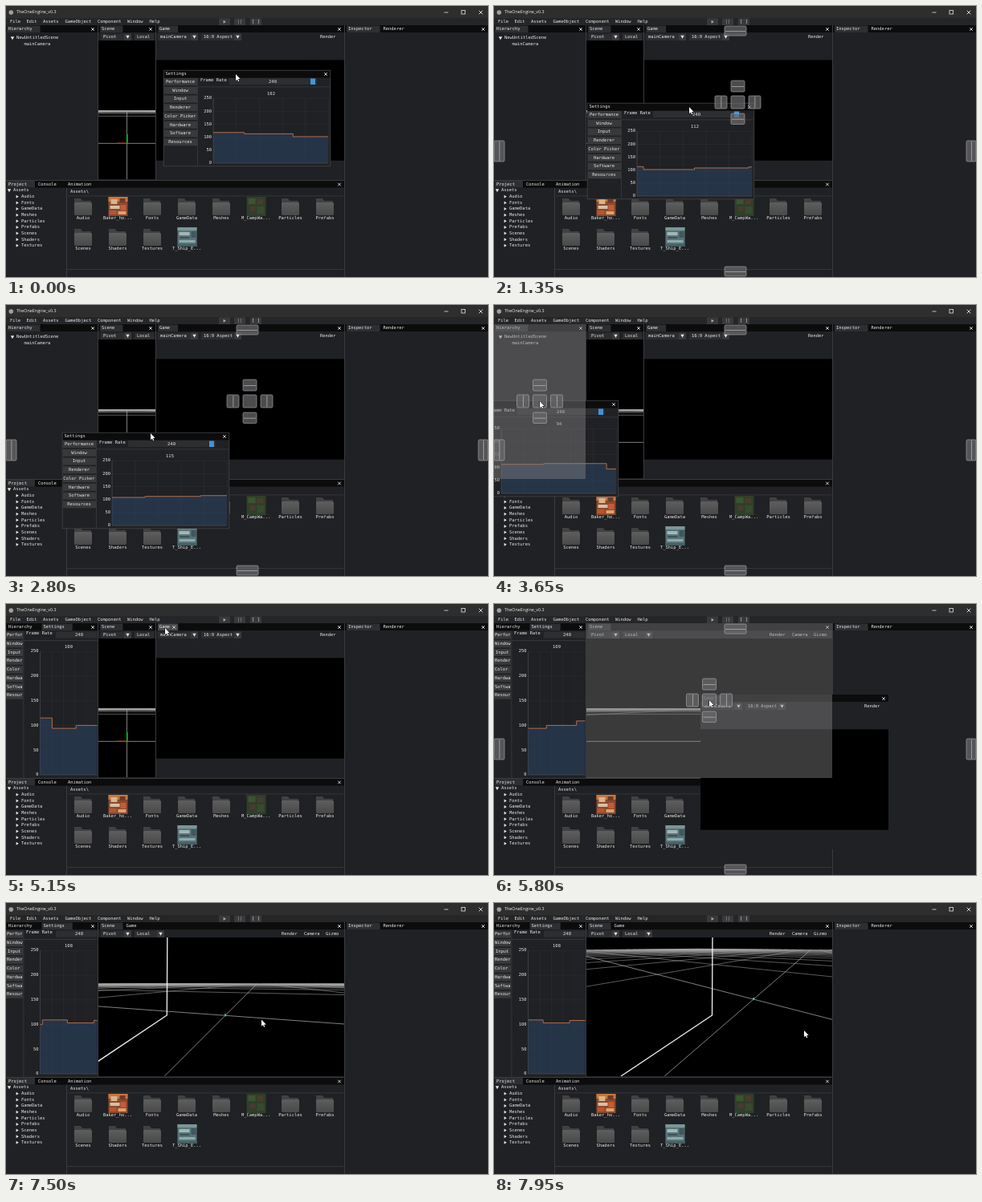
Recreate the animation shown at these times as an HTML page with a canvas. Size 600x338 px, loop 8000 ms.

```html
<!DOCTYPE html>
<html lang="en">
<head>
<meta charset="utf-8">
<title>Engine editor</title>
<style>
html, body { margin: 0; width: 100%; height: 100%; overflow: hidden; background: #202123; }
canvas { display: block; }
</style>
</head>
<body>
<canvas id="stage" width="600" height="338"></canvas>
<script>
const ctx = document.getElementById('stage').getContext('2d');
const LOOP = 8000, STEP = 50;
const MONO = '5.45px "DejaVu Sans Mono", monospace', CHAR = 3.28;
const BG = '#202124', BAR = '#0c0c0d', TAB = '#2e2f32', HOVER = '#4b4b4d', FRAME = '#38393b';
const EDGE = '#3a3b40', INK = '#e6e6e6';

// ---- helpers
function rect(x, y, w, h, color) { ctx.fillStyle = color; ctx.fillRect(x, y, w, h); }

function text(s, x, y, align = 'left', color = INK) {
  ctx.font = MONO;
  ctx.textAlign = align;
  ctx.fillStyle = color;
  ctx.fillText(s, x, y);
}

function path(points, color, width = 1) {
  ctx.beginPath();
  points.forEach(([x, y]) => ctx.lineTo(x, y));
  ctx.strokeStyle = color;
  ctx.lineWidth = width;
  ctx.stroke();
}

function shape(points, color) {
  ctx.beginPath();
  points.forEach(([x, y]) => ctx.lineTo(x, y));
  ctx.fillStyle = color;
  ctx.fill();
}

function clipped(x, y, w, h, draw) {
  ctx.save();
  ctx.beginPath();
  ctx.rect(x, y, w, h);
  ctx.clip();
  draw();
  ctx.restore();
}

function cross(x, y, r = 1.8) {
  path([[x - r, y - r], [x + r, y + r]], INK, 0.9);
  path([[x - r, y + r], [x + r, y - r]], INK, 0.9);
}

const arrowDown = (x, y, r = 2.2) => shape([[x - r, y - r * 0.8], [x + r, y - r * 0.8], [x, y + r]], INK);
const arrowRight = (x, y, color = INK) => shape([[x - 1.4, y - 2], [x - 1.4, y + 2], [x + 1.8, y]], color);
const mix = (a, b, k) => a + (b - a) * k;
const smooth = k => k * k * (3 - 2 * k);
const clamp01 = k => Math.min(1, Math.max(0, k));

// keys: [time, x, y] in order
function follow(keys, t) {
  const i = keys.findIndex(key => key[0] > t);
  if (i < 0) return keys[keys.length - 1].slice(1);
  if (i === 0) return keys[0].slice(1);
  const [a, b] = [keys[i - 1], keys[i]];
  const k = smooth((t - a[0]) / (b[0] - a[0]));
  return [mix(a[1], b[1], k), mix(a[2], b[2], k)];
}

// ---- timeline
const CURSOR = [
  [0, 286, 85], [250, 430, 45], [450, 531, 21], [650, 440, 55], [850, 322, 85], [950, 322, 85],
  [1350, 243, 126], [1600, 160, 172], [1750, 140, 183], [1900, 290, 90], [2000, 410, 7],
  [2120, 487, 50], [2250, 376, 106], [2500, 285, 140], [2800, 180, 160], [2950, 150, 185],
  [3250, 60, 110], [3500, 57, 120], [3900, 57, 120], [4250, 70, 110], [4700, 230, 12],
  [5000, 198, 30], [5200, 198, 30], [5600, 268, 120], [5950, 268, 120], [6300, 20, 285],
  [6650, 126, 30], [6950, 126, 30], [7250, 290, 140], [7950, 386, 159]];
const GRAB = [[950, 126, 5], [1350, 127, 5], [2250, 117.5, 6], [2800, 110.5, 1]];
const DRAG_SETTINGS = 900, DOCK_SETTINGS = 3700;
const DRAG_GAME = 5200, DROP_GAME = 5950, DOCK_GAME = 6000, PICK_SCENE = 6900;
const FPS = [[-9999, 118], [-1544, 113], [-647, 102], [291, 108], [1291, 112], [2315, 115],
  [3474, 94], [4356, 100], [5465, 109], [6383, 103], [7362, 108]];
const fpsAt = t => FPS.filter(f => f[0] <= t).pop()[1];

// ---- panels
function panel(x, y, w, h, tabs, selected, hovered = -1) {
  rect(x, y, w, h, BG);
  rect(x, y, w, 9, BAR);
  let tx = x === 0 ? 3 : x + 4;
  tabs.forEach((name, i) => {
    const width = name.length * CHAR;
    const color = i === selected ? (i === hovered ? HOVER : TAB) : BAR;
    rect(tx - 2, y + 0.5, width + 12, 8.5, color);
    text(name, tx, y + 5);
    if (i === hovered) cross(tx + width + 5, y + 5);
    tx += width + 14;
  });
  cross(x + w - 6, y + 5);
}

function combo(label, x, w, arrow = true) {
  rect(x, 34.5, w, 8.5, '#2c2d2f');
  if (arrow) {
    rect(x + w - 9, 34.5, 9, 8.5, FRAME);
    arrowDown(x + w - 4.5, 38.5);
  }
  text(label, x + 3, 38.7);
}

function gameBody(x, w, y = 24) {
  ctx.save();
  ctx.translate(0, y - 24);
  combo('mainCamera', x + 2, 50);
  combo('16:9 Aspect', x + 56, 50);
  text('Render', x + w - 30, 38.7);
  const viewHeight = Math.min(164, w * 0.536);
  rect(x, 130 - viewHeight / 2, w, viewHeight, '#000');
  ctx.restore();
}

// Perspective ground grid; k goes from the front view (0) to the turned view (1)
function sceneView(x, w, k) {
  const cx = x + w / 2, f = 158;
  const angle = 0.685 * k, c = Math.cos(angle), s = Math.sin(angle);
  const height = 0.0535 * Math.pow(0.275 / 0.0535, k);
  const horizon = mix(130.3, 56, k);
  const ox = -0.246 * k, oz = mix(0.206, 0.675, k);
  const project = (u, v) => [(u + ox) * c + (v + oz) * s, (v + oz) * c - (u + ox) * s];
  const toScreen = ([px, pz]) => [cx + f * px / pz, horizon + f * height / pz];
  function line(a, b, color, width) {
    let [p, q] = [project(...a), project(...b)];
    const near = 0.02;
    if (p[1] < near && q[1] < near) return;
    if (p[1] > q[1]) [p, q] = [q, p];
    if (p[1] < near) p = [mix(p[0], q[0], (near - p[1]) / (q[1] - p[1])), near];
    path([toScreen(p), toScreen(q)], color, width);
  }
  clipped(x, 43, w, 173, () => {
    rect(x, 43, w, 173, '#000');
    for (let i = -24; i <= 24; i++) {
      const color = i ? `rgba(165,165,165,${0.72 - Math.abs(i) * 0.022})` : '#a0a0a0';
      line([i, -24], [i, 24], color, 0.8);
      line([-24, i], [24, i], color, 0.8);
    }
    if (k < 0.3) {
      rect(cx - 0.5, 160, 1.6, 11, '#00d020');
      rect(cx - 12, 170.4, 12, 1, '#b02818');
    } else {
      const shift = (1 - k) * 120;
      path([[158 - shift, 216], [271.5 - shift, 140], [272 - shift, 43]], '#f4f4f4', 1.3);
      const [gx, gy] = toScreen(project(0, 0));
      rect(gx - 1, gy - 2, 2, 3, '#4fb8b0');
    }
  });
}

function scenePanel(t) {
  const merged = t >= DRAG_GAME, docked = t >= DOCK_GAME;
  const w = merged ? 306 : 71;
  const showGame = docked && t < PICK_SCENE;
  panel(115, 24, w, 193, docked ? ['Scene', 'Game'] : ['Scene'], showGame ? 1 : 0, t >= 6600 && t < 7050 ? 0 : -1);
  if (showGame) return gameBody(115, w);
  combo('Pivot', 118, 38);
  combo('Local', 160, merged ? 37 : 24, merged);
  if (merged) [['Render', 343], ['Camera', 371], ['Gizmo', 398]].forEach(([s, x]) => text(s, x, 38.7));
  sceneView(115, w, smooth(clamp01((t - 7150) / 800)));
}

// ---- settings
const PAGES = ['Performance', 'Window', 'Input', 'Renderer', 'Color Picker', 'Hardware', 'Software', 'Resources'];

function plot(x, y, w, h, t) {
  const span = 2118, right = x + w, bottom = y + h;
  const level = v => bottom - v * h / 250;
  for (let i = 0; i <= 5; i++) {
    rect(x, level(i * 50), w, 0.6, 'rgba(255,255,255,.05)');
    rect(x + i * w / 5, y, 0.6, h, 'rgba(255,255,255,.06)');
    text(String(i * 50), x - 2, level(i * 50), 'right');
  }
  const points = [];
  FPS.forEach(([time, v], i) => {
    if (time > t) return;
    const px = right - (t - time) / span * w;
    if (i) points.push([px, level(FPS[i - 1][1])]);
    points.push([px, level(v)]);
  });
  points.push([right, level(fpsAt(t))]);
  clipped(x, y, w, h, () => {
    shape([...points, [right, bottom], [x - 9999, bottom]], 'rgba(42,66,98,.6)');
    path(points, '#b06c48', 1);
  });
  path([[x, y], [x, bottom], [right, bottom]], '#4c4e52', 0.6);
}

function settingsFloating(x, y, t) {
  ctx.save();
  ctx.translate(Math.round(x), Math.round(y));
  rect(0, 0, 208, 120, BG);
  rect(0, 0, 208, 9.5, BAR);
  text('Settings', 2.5, 5);
  cross(202, 5);
  PAGES.forEach((name, i) => {
    rect(1, 10 + i * 10.75, 41, 9, FRAME);
    text(name, 21, 14.4 + i * 10.75, 'center');
  });
  rect(42, 10, 0.8, 109, EDGE);
  text('Frame Rate', 46, 13);
  rect(82, 10, 109, 8, '#2d2e30');
  rect(183, 10.5, 6, 7.5, '#3c96dc');
  text('240', 136, 14.3, 'center');
  rect(43, 20.5, 164, 0.8, EDGE);
  text(String(fpsAt(t)), 134, 30, 'center');
  plot(62, 35, 143, 81, t);
  ctx.strokeStyle = '#434446';
  ctx.lineWidth = 0.8;
  ctx.strokeRect(0.2, 0.2, 207.6, 119.6);
  ctx.restore();
}

function settingsDocked(t) {
  panel(0, 24, 114, 193, ['Hierarchy', 'Settings'], 1);
  clipped(0, 33, 21, 184, () => PAGES.forEach((name, i) => {
    rect(0, 34.5 + i * 10.75, 21, 9, FRAME);
    text(name, name.length < 6 ? 2 : 1, 38.8 + i * 10.75);
  }));
  rect(21.5, 34, 0.8, 183, EDGE);
  clipped(22, 33, 91.5, 184, () => {
    text('Frame Rate', 25, 37);
    rect(62, 34.5, 58, 8, '#2d2e30');
    text('240', 91, 38.5, 'center');
    rect(22, 45, 92, 0.8, EDGE);
    text(String(fpsAt(t)), 78, 54, 'center');
    plot(42.5, 59, 71.5, 154, t);
  });
}

// ---- asset browser
function folder(cx, y) {
  shape([[cx - 11, y + 1], [cx - 3, y + 1], [cx - 1, y + 4], [cx + 10, y + 4], [cx + 10, y + 8], [cx - 11, y + 8]], '#414141');
  const shade = ctx.createLinearGradient(0, y + 6, 0, y + 22);
  shade.addColorStop(0, '#5e5e5e');
  shade.addColorStop(1, '#494949');
  ctx.beginPath();
  ctx.roundRect(cx - 11, y + 6, 22, 16, 1.5);
  ctx.fillStyle = shade;
  ctx.fill();
}

const PICTURES = {
  'Baker_ho...': (x, y) => {
    rect(x, y, 24, 24, '#8a4a2e');
    rect(x, y, 24, 6, '#c8763c');
    rect(x + 3, y + 3, 8, 6, '#d9b48c');
    rect(x + 14, y + 2, 7, 5, '#6d3a2a');
    rect(x + 2, y + 11, 12, 4, '#d6c0a4');
    rect(x + 15, y + 10, 7, 7, '#c85a34');
    rect(x + 1, y + 17, 9, 5, '#b8552f');
    rect(x + 12, y + 18, 10, 4, '#dca270');
  },
  'M_CampWa...': (x, y) => {
    rect(x, y, 24, 24, '#2f3f29');
    rect(x + 2, y + 2, 9, 7, '#3c5430');
    rect(x + 13, y + 3, 8, 6, '#4a3b2e');
    rect(x + 4, y + 12, 7, 6, '#4b3a33');
    rect(x + 13, y + 12, 9, 9, '#37492f');
  },
  'T_Ship_E...': (x, y) => {
    rect(x, y, 24, 24, '#587478');
    rect(x, y, 24, 4, '#7b9699');
    rect(x + 2, y + 6, 13, 4, '#a3b6b6');
    rect(x + 17, y + 5, 6, 8, '#3f585e');
    rect(x + 3, y + 12, 12, 2, '#39535a');
    rect(x + 2, y + 16, 20, 3, '#8fa9aa');
    rect(x, y + 21, 24, 3, '#435f65');
  }
};
const ASSETS = [
  ['Audio', 'Baker_ho...', 'Fonts', 'GameData', 'Meshes', 'M_CampWa...', 'Particles', 'Prefabs'],
  ['Scenes', 'Shaders', 'Textures', 'T_Ship_E...']];
const FOLDERS = ASSETS.flat().filter(name => !PICTURES[name]);

function projectPanel() {
  panel(0, 217.5, 421, 120.5, ['Project', 'Console', 'Animation'], 0);
  arrowDown(4, 230);
  text('Assets', 9, 230);
  FOLDERS.forEach((name, i) => {
    arrowRight(14, 237.8 + i * 7.63);
    text(name, 19, 237.8 + i * 7.63);
  });
  rect(75, 227, 1, 111, EDGE);
  text('Assets\\', 80, 231.8);
  rect(77, 236.5, 343, 0.8, EDGE);
  rect(76, 328, 344, 0.8, EDGE);
  ASSETS.forEach((row, r) => row.forEach((name, i) => {
    const cx = 96 + i * 43, y = 239 + r * 38;
    if (PICTURES[name]) PICTURES[name](cx - 12 + 0.5, y - 1);
    else folder(cx, y);
    text(name, cx, y + 26, 'center');
  }));
}

// ---- docking guides
function guide(x, y, w, h, split) {
  ctx.beginPath();
  ctx.roundRect(x, y, w, h, 1.5);
  ctx.fillStyle = 'rgba(105,106,108,.72)';
  ctx.fill();
  ctx.strokeStyle = 'rgba(175,175,175,.75)';
  ctx.lineWidth = 0.8;
  ctx.stroke();
  if (split === 'h') rect(x + 1, y + h / 2, w - 2, 0.8, 'rgba(195,195,195,.8)');
  if (split === 'v') rect(x + w / 2, y + 1, 0.8, h - 2, 'rgba(195,195,195,.8)');
}

function dockGuides(cx) {
  guide(287, 25, 27, 12, 'h');
  guide(287, 325, 27, 12, 'h');
  guide(0, 168, 13, 26, 'v');
  guide(588, 168, 12, 26, 'v');
  guide(cx - 8.5, 112, 17, 16);
  guide(cx - 8.5, 93, 17, 14, 'h');
  guide(cx - 8.5, 134, 17, 13.5, 'h');
  guide(cx - 28.5, 112, 15, 16, 'v');
  guide(cx + 13.5, 112, 15, 16, 'v');
}

// ---- window frame
function chrome() {
  rect(0, 0, 600, 338, BG);
  rect(0, 0, 600, 15, '#2e2e2e');
  rect(0, 0, 600, 1, '#25301f');
  ctx.beginPath();
  ctx.arc(6.3, 8, 2.8, 0, 7);
  ctx.fillStyle = '#a0a0a0';
  ctx.fill();
  ctx.font = '5.4px "Open Sans", sans-serif';
  ctx.textAlign = 'left';
  ctx.fillStyle = '#f2f2f2';
  ctx.fillText('TheOneEngine_v0.3', 13, 8);
  path([[545.5, 8], [550.5, 8]], INK, 0.8);
  ctx.strokeStyle = INK;
  ctx.strokeRect(567, 5.5, 4.5, 4.5);
  cross(591, 8, 2.3);
  rect(0, 15, 600, 9, '#252628');
  [['File', 5], ['Edit', 25.5], ['Assets', 46], ['GameObject', 73.5], ['Component', 114], ['Window', 151], ['Help', 178.5]]
    .forEach(([s, x]) => text(s, x, 19.6));
  [265, 284, 304].forEach(x => rect(x, 15.5, 14, 8.5, FRAME));
  arrowRight(272, 19.7, '#b0b0b0');
  text('||', 291, 19.6, 'center', '#b0b0b0');
  text('[ ]', 311, 19.6, 'center');
}

function pointer(x, y) {
  const outline = [[0, 0], [0, 8.2], [1.9, 6.5], [3.1, 9.2], [4.3, 8.7], [3.1, 6.1], [5.7, 6]];
  const points = outline.map(([dx, dy]) => [x + dx, y + dy]);
  path([...points, points[0]], '#000', 1);
  shape(points, '#fff');
}

function draw(t) {
  const [mx, my] = follow(CURSOR, t);
  const settingsMoving = t >= DRAG_SETTINGS && t < DOCK_SETTINGS;
  const gameMoving = t >= DRAG_GAME && t < DROP_GAME;

  chrome();
  if (t < DOCK_SETTINGS) {
    panel(0, 24, 114, 193, ['Hierarchy'], 0);
    arrowDown(8, 40);
    text('NewUntitledScene', 13, 40);
    text('mainCamera', 22.5, 47.8);
  } else settingsDocked(t);
  scenePanel(t);
  if (t < DRAG_GAME) {
    panel(187, 24, 234, 193, ['Game'], 0, t >= 4950 ? 0 : -1);
    gameBody(187, 234);
  }
  panel(422, 24, 178, 314, ['Inspector', 'Renderer'], 0);
  projectPanel();
  rect(114, 24, 1, 193, EDGE);
  if (t < DRAG_GAME) rect(186, 24, 1, 193, EDGE);
  rect(421, 24, 1, 314, EDGE);
  rect(0, 217, 421, 1, EDGE);

  if (t < DOCK_SETTINGS) {
    const [gx, gy] = follow(GRAB, t);
    const [wx, wy] = settingsMoving ? [mx - gx, my - gy] : [196, 80];
    settingsFloating(wx, wy, t);
  }
  if (t >= DRAG_GAME && t < DOCK_GAME) {
    const x = Math.round(mx - 11), y = Math.round(my - 7);
    panel(x, y, 234, 193, ['Game'], 0);
    gameBody(x, 234, y);
  }
  if (settingsMoving || gameMoving) {
    const preview = 'rgba(130,130,132,.45)';
    if (settingsMoving && t >= 3350) rect(0, 24, 114, 193, preview);
    if (gameMoving && t >= 5550) rect(115, 24, 306, 193, preview);
    dockGuides(gameMoving ? 268 : mx < 115 ? 57 : 303.5);
  }
  pointer(mx, my);
}

ctx.textBaseline = 'middle';
ctx.textRendering = 'geometricPrecision';
const start = performance.now();
function tick() {
  const t = (performance.now() - start) % LOOP;
  draw(Math.floor(t / STEP) * STEP);
  requestAnimationFrame(tick);
}
tick();
</script>
</body>
</html>
```
